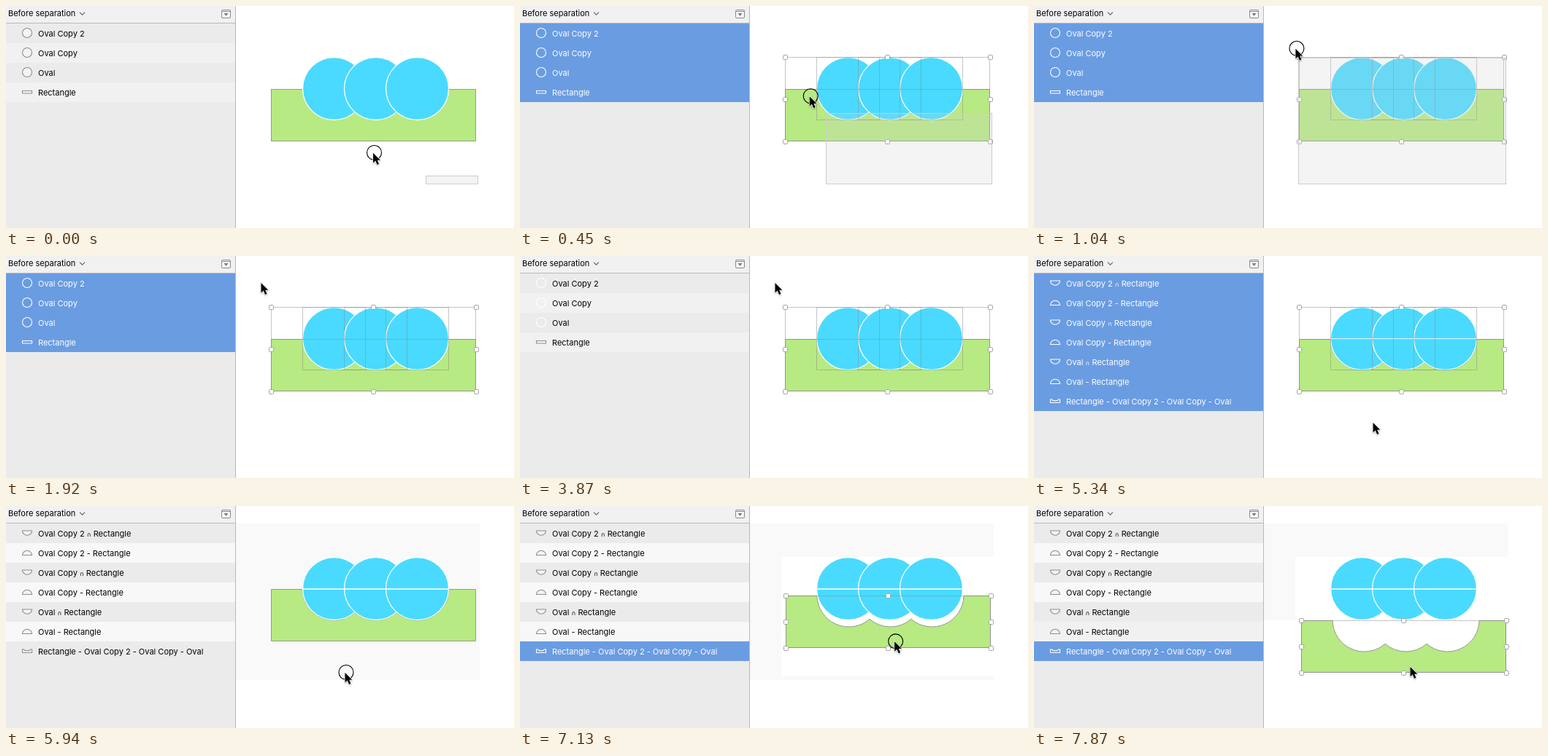
Animation, 696 px wide and 305 px high, one loop 8 s. Source, as an HTML page:

```html
<!DOCTYPE html>
<html lang="en">
<head>
<meta charset="utf-8">
<title>Separating layers</title>
<style>
  html, body { margin: 0; width: 100%; height: 100%; overflow: hidden; background: #fff; }
  svg { display: block; width: 696px; height: 305px; }
  text { font: 11px Inter, "Open Sans", sans-serif; white-space: pre; }
  .cap { font-family: "DejaVu Sans", sans-serif; font-size: 8px; }
  .icon { stroke-width: 1.1; }
  .green { fill: #b7ea82; stroke: #979797; }
  .oval { fill: #4adaff; stroke: #fff; stroke-width: 1.3; }
  .outline { fill: none; stroke: #8c8c8c; stroke-opacity: .5; }
  .handle { fill: #fff; stroke: #a2a2a2; }
  .marquee { fill: rgba(207, 207, 207, .23); stroke: #ccc; }
  .ring { fill: none; stroke: #000; stroke-width: 1.1; }
  .arrow { stroke: #fff; stroke-width: 1.2; paint-order: stroke; filter: drop-shadow(0 1px 1px rgba(0, 0, 0, .3)); }
</style>
</head>
<body>
<svg viewBox="0 0 696 305">
  <g id="canvas"></g>
  <rect width="314" height="305" fill="#ebebeb"/>
  <g id="list"></g>
  <rect width="314" height="23" fill="#f1f1f1"/>
  <path d="M0 23.5H314M314.5 0V305" stroke="#b9b9b9"/>
  <text x="3" y="14">Before separation</text>
  <path d="M101 8.7l3.5 3.5 3.5-3.5" fill="none" stroke="#666" stroke-width="1.2"/>
  <rect x="295.500" y="5.500" width="12" height="11" rx="1.500" fill="#f6f6f6" stroke="#8a8a8a"/>
  <path d="M296 7.500h11" stroke="#8a8a8a"/>
  <path d="M298.500 10h6l-3 3.800z" fill="#777"/>
  <g id="pointer"></g>
</svg>
<script>
const LOOP = 8000;
const ROW = 27;
const OVALS = [449.5, 506.5, 563.5];
const RADIUS = 43.5;
const OVAL_Y = 113.5;
const ALL_BOX = [363, 70, 644, 186];
const RECT_BOX = [363, 114, 644, 186];

const WHOLE = [['oval', 'Oval Copy 2'], ['oval', 'Oval Copy'], ['oval', 'Oval'], ['bar', 'Rectangle']];
const CAP = '<tspan class="cap">∩</tspan>';
const PARTS = ['Oval Copy 2', 'Oval Copy', 'Oval']
  .flatMap(name => [['bowl', `${name} ${CAP} Rectangle`], ['dome', `${name} - Rectangle`]])
  .concat([['scoop', 'Rectangle - Oval Copy 2 - Oval Copy - Oval']]);

// Icon outlines relative to the middle of a row.
const ICONS = {
  oval: 'M-6.5 -.5a6.5 6.5 0 0 1 13 0a6.500 6.500 0 0 1 -13 0z',
  bar: 'M-6.500 -2h13v3.500h-13z',
  bowl: 'M-6.500 -3.500h13a6.500 6.300 0 0 1 -13 0z',
  dome: 'M-6.500 3h13a6.500 6.300 0 0 0 -13 0z',
  scoop: 'M-6.500 -2.500h2q1 2 2.500 1.500q2 .8 4 0q1.500 .5 2.500 -1.500h2v4.500h-13z'
};

const byId = id => document.getElementById(id);
const mix = (a, b, k) => a + (b - a) * k;
const box = (x1, y1, x2, y2, attrs) =>
  `<rect x="${x1}" y="${y1}" width="${x2 - x1}" height="${y2 - y1}" ${attrs}/>`;

// Number of evenly spaced steps taken by time t.
function stepsTaken(t, start, end, count) {
  if (t < start) return 0;
  return Math.min(count, 1 + Math.floor((t - start + 4) * (count - 1) / (end - start)));
}

const sweep = k => [348 + 155 * .68 ** k, 37 + 165 * (1 - k / 11) ** 2];

function pointerAt(t) {
  if (t < 1920) return sweep(stepsTaken(t, 150, 1630, 11));
  if (t < 5940) {
    const k = [0, .1, .35, .65, .87, .97, 1][stepsTaken(t, 4610, 5340, 6)];
    return [mix(349.500, 464.500, k), mix(37, 229, k)];
  }
  if (t < 7130) {
    const k = [0, .2, .6, .9, 1][stepsTaken(t, 6090, 6530, 4)];
    return [mix(464.500, 512.500, k), mix(229, 178, k)];
  }
  if (t >= 7870) return [515.500, 221];
  const k = [0, .22, .6, .88, 1][stepsTaken(t, 7130, 7570, 4)];
  return [mix(512.500, 515.500, k), mix(178, 216, k)];
}

function stateAt(t) {
  const k = stepsTaken(t, 150, 1630, 11);
  const split = t >= 4010;
  const drag = [0, .2, .56, .85, 1][stepsTaken(t, 7130, 7570, 4)];
  let selection = 'none';
  if (t < 5940) selection = k > 2 ? 'all' : k > 1 ? 'rect' : 'none';
  else if (t >= 6830) selection = 'rect';
  return {
    split, selection,
    marquee: t < 1920 ? sweep(k - 1) : null,
    refreshing: t >= 3870 && t < 4010,
    shift: [Math.round(3 * drag), Math.round(43 * drag)],
    pointer: pointerAt(t),
    pressed: t < 1920 || (t >= 5940 && t < 6090) || (t >= 6830 && t < 7870),
    tint: t >= 5940,
    dragged: t >= 7130,
    dropped: t >= 7870
  };
}

function drawHandles([x1, y1, x2, y2]) {
  const xs = [x1, (x1 + x2) / 2, x2], ys = [y1, (y1 + y2) / 2, y2];
  let out = box(x1 + .5, y1 + .5, x2 - .5, y2 - .5, 'class="outline"');
  ys.forEach((y, j) => xs.forEach((x, i) => {
    if (i !== 1 || j !== 1) {
      const left = Math.floor(x) - 2.5, top = Math.floor(y) - 2.5;
      out += box(left, top, left + 6, top + 6, 'rx="1" class="handle"');
    }
  }));
  return out;
}

function drawRectangle(s) {
  if (!s.split) return box(363.5, 114.5, 643.5, 185.5, 'class="green"');
  const arc = `A${RADIUS} ${RADIUS} 0 0 0 `;
  const cusp = OVAL_Y + Math.sqrt(RADIUS ** 2 - 28.5 ** 2);
  return `<path class="green" transform="translate(${s.shift})" d="M363.5 114.5H406
    ${arc}478 ${cusp}${arc}535 ${cusp}${arc}607 114.5H643.5V185.5H363.5z"/>`;
}

function drawCanvas(s) {
  let out = '';
  if (s.tint) {
    out += box(315, 24, 649, 239, 'fill="#f9f9f9"');
    if (s.dragged) out += box(358, 70, 651, 234, 'fill="#fff"');
    if (s.dropped) out += box(315, 157, 651, 239, 'fill="#fff"');
  }
  const ovals = OVALS.map(x =>
    `<circle class="oval" cx="${x}" cy="${OVAL_Y}" r="43"/>` +
    (s.split ? `<path class="oval" d="M${x - 43} 114h86"/>` : '')).join('');
  out += drawRectangle(s) + ovals;

  if (s.selection === 'all') {
    out += OVALS.map(x => box(x - 43, 70.5, x + 43, 156.5, 'class="outline"')).join('');
    out += '<path class="outline" d="M363 114.5H644"/>' + drawHandles(ALL_BOX);
  } else if (s.selection === 'rect') {
    out += drawHandles(RECT_BOX.map((v, i) => v + s.shift[i % 2]));
  }
  if (s.marquee) {
    const [x, y] = s.marquee.map(Math.round);
    out += box(x - .5, y + .5, 646.5, 244.5, 'class="marquee"');
  }
  return out;
}

function drawList(s) {
  const rows = s.split ? PARTS : WHOLE;
  return rows.map(([icon, label], i) => {
    const top = 24 + i * ROW;
    const last = i === rows.length - 1;
    const on = !s.refreshing && (s.selection === 'all' || (s.selection === 'rect' && last));
    const light = s.tint && !(s.dropped && i === 5) ? '#f8f8f8' : '#f1f1f1';
    const back = on ? '#6a9ce2' : i % 2 ? light : '#ebebeb';
    const pale = on || (s.refreshing && icon === 'oval');
    return box(0, top, 314, top + ROW, `fill="${back}"`) +
      `<path class="icon" transform="translate(29 ${top + 13.5})" d="${ICONS[icon]}"
        fill="${pale ? 'none' : '#f3f3f3'}" stroke="${pale ? '#fff' : '#8e8e8e'}"/>` +
      `<text x="44" y="${top + 18}" fill="${on ? '#fff' : '#000'}">${label}</text>`;
  }).join('');
}

function drawPointer(s) {
  const [x, y] = s.pointer;
  const ring = s.pressed ? '<circle class="ring" cx="1.500" cy="-.5" r="10"/>' : '';
  return `<g transform="translate(${x} ${y})">${ring}
    <path class="arrow" d="M0 0V13.500L3.200 10.600 5.500 16 8 15 5.700 9.700H9.800z"/></g>`;
}

let shown = '';
function render() {
  const state = stateAt(performance.now() % LOOP);
  const key = JSON.stringify(state);
  if (key !== shown) {
    shown = key;
    byId('canvas').innerHTML = drawCanvas(state);
    byId('list').innerHTML = drawList(state);
    byId('pointer').innerHTML = drawPointer(state);
  }
  requestAnimationFrame(render);
}
render();
</script>
</body>
</html>
```
